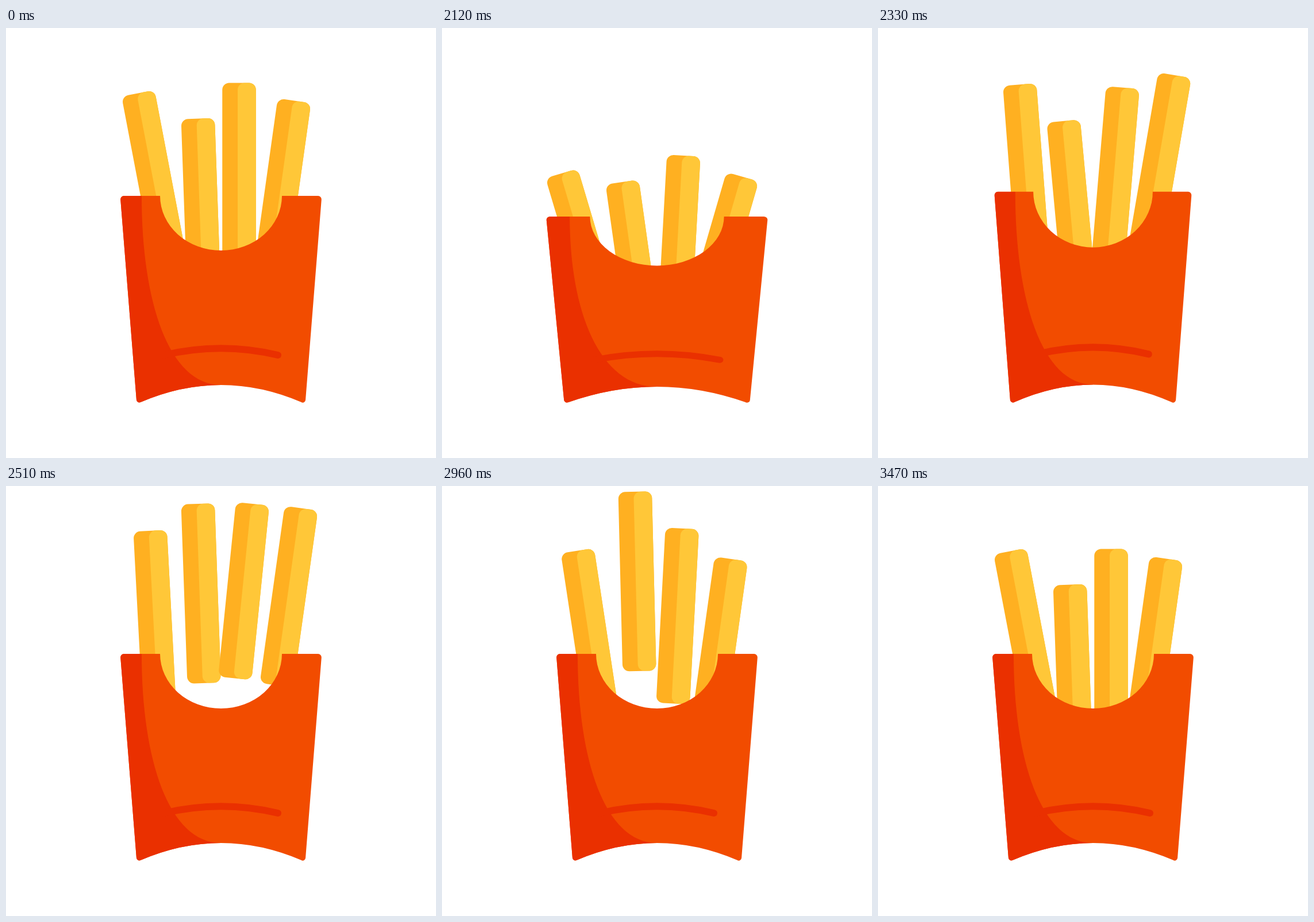
These frames come from a looping animation (748x748 px, 3.5 s). An HTML page with a canvas:

```html
<!DOCTYPE html>
<html>
<head>
<meta charset="utf-8">
<style>
  html, body { margin: 0; width: 100%; height: 100%; overflow: hidden; background: #fff; }
  canvas { display: block; width: 748px; height: 748px; }
</style>
</head>
<body>
<canvas id="stage" width="748" height="748"></canvas>
<script>
const ctx = document.getElementById('stage').getContext('2d');
const LOOP = 3500, MOVE = 2030, STEP = 30;
const SQUASH_AT = 2000, LAUNCH_AT = 2120, BOUNCE = 14, SETTLE_TIME = 150;
const CENTER = 374, FLOOR = 652;
const ORANGE = '#f24c00', RED = '#ea3000', AMBER = '#ffb021', YELLOW = '#ffc738';

const mix = (a, b, u) => a + (b - a) * u;
const smooth = u => u * u * (3 - 2 * u);
const pose = (x, y, tilt) => ({ x, y, tilt });
const blend = (a, b, u) => pose(mix(a.x, b.x, u), mix(a.y, b.y, u), mix(a.tilt, b.tilt, u));
const lowered = (p, drop) => pose(p.x, p.y + drop, p.tilt);

// Poses place the top middle; sag is the part of the way home drifted before the fall
const fries = [
  { length: 311, rest: pose(229.7, 113.4, -10.8), crouch: pose(208.1, 252.9, -16.6),
    peak: pose(251.8, 76, -2.6), peakAt: 2390, sag: 0.25, fallAt: 2810, landAt: 3060, sink: 0 },
  { length: 312, rest: pose(333.8, 157.6, -2), crouch: pose(313.4, 268, -8),
    peak: pose(335.8, 6.9, -1.4), peakAt: 2600, sag: 0, fallAt: 2930, landAt: 3320, sink: 14 },
  { length: 305, rest: pose(405.5, 95.5, 0), crouch: pose(420.4, 222, 3.15),
    peak: pose(429, 30.9, 5.8), peakAt: 2482, sag: 0.08, fallAt: 2810, landAt: 3140, sink: 14 },
  { length: 311, rest: pose(501.6, 126.5, 8), crouch: pose(522.8, 258.8, 16.2),
    peak: pose(514.4, 33.4, 8), peakAt: 2420, sag: 0.42, fallAt: 2810, landAt: 3020, sink: 0 }
];

// Eases through [time, value] stops and holds at both ends
function follow(stops, t, between) {
  const next = stops.findIndex(([time]) => time > t);
  if (next === 0) return stops[0][1];
  if (next < 0) return stops[stops.length - 1][1];
  const [t0, a] = stops[next - 1], [t1, b] = stops[next];
  return between(a, b, smooth((t - t0) / (t1 - t0)));
}

function fryPose({ rest, crouch, peak, peakAt, sag, fallAt, landAt, sink }, t) {
  return follow([
    [SQUASH_AT, rest],
    [LAUNCH_AT, crouch],
    [peakAt, peak],
    [fallAt, blend(peak, rest, sag)],
    [landAt, lowered(rest, sink + BOUNCE)],
    [landAt + SETTLE_TIME, lowered(rest, sink)]
  ], t, blend);
}

const squashAt = t =>
  follow([[SQUASH_AT, 0], [LAUNCH_AT, 0.1], [2270, -0.025], [2480, 0]], t, mix);

function roundedBar(x, width, length, color) {
  ctx.fillStyle = color;
  ctx.beginPath();
  ctx.roundRect(x, 0, width, length, 12);
  ctx.fill();
}

function drawFry(fry, t) {
  const { x, y, tilt } = fryPose(fry, t);
  ctx.save();
  ctx.translate(x, y);
  ctx.rotate(tilt * Math.PI / 180);
  roundedBar(-29.25, 58.5, fry.length, AMBER);
  roundedBar(-2.5, 31.75, fry.length, YELLOW);
  ctx.restore();
}

function cartonPath() {
  ctx.beginPath();
  ctx.moveTo(268, 292);
  ctx.ellipse(CENTER, 292, 106, 95, 0, Math.PI, 0, true);
  ctx.arcTo(549.3, 292, 520.5, 654, 6);
  ctx.arcTo(520.5, 654, CENTER, 591, 5);
  ctx.lineTo(514, 651);
  ctx.quadraticCurveTo(CENTER, 591, 234, 651);
  ctx.arcTo(227.5, 654, 198.7, 292, 5);
  ctx.arcTo(198.7, 292, 268, 292, 6);
  ctx.closePath();
}

function drawShade() {
  ctx.save();
  ctx.clip();
  ctx.fillStyle = RED;
  ctx.beginPath();
  ctx.moveTo(236, 292);
  ctx.bezierCurveTo(236, 475, 283, 621, CENTER, 621);
  ctx.lineTo(CENTER, 670);
  ctx.lineTo(180, 670);
  ctx.lineTo(180, 292);
  ctx.fill();
  ctx.restore();
}

function drawCrease() {
  ctx.strokeStyle = RED;
  ctx.lineWidth = 12;
  ctx.lineCap = 'round';
  ctx.beginPath();
  ctx.moveTo(275, 569);
  ctx.quadraticCurveTo(CENTER, 545.5, 473, 569);
  ctx.stroke();
}

function drawCarton(t) {
  const squash = squashAt(t);
  ctx.save();
  ctx.translate(CENTER, FLOOR);
  ctx.scale(1 + squash, 1 - squash);
  ctx.translate(-CENTER, -FLOOR);
  cartonPath();
  ctx.fillStyle = ORANGE;
  ctx.fill();
  drawShade();
  drawCrease();
  ctx.restore();
}

function render(now) {
  const t = now % LOOP;
  const held = t < MOVE ? 0 : MOVE + Math.floor((t - MOVE) / STEP) * STEP;
  ctx.fillStyle = '#fff';
  ctx.fillRect(0, 0, 748, 748);
  fries.forEach(fry => drawFry(fry, held));
  drawCarton(held);
}

const start = performance.now();
function tick() {
  render(performance.now() - start);
  requestAnimationFrame(tick);
}
tick();
</script>
</body>
</html>
```
